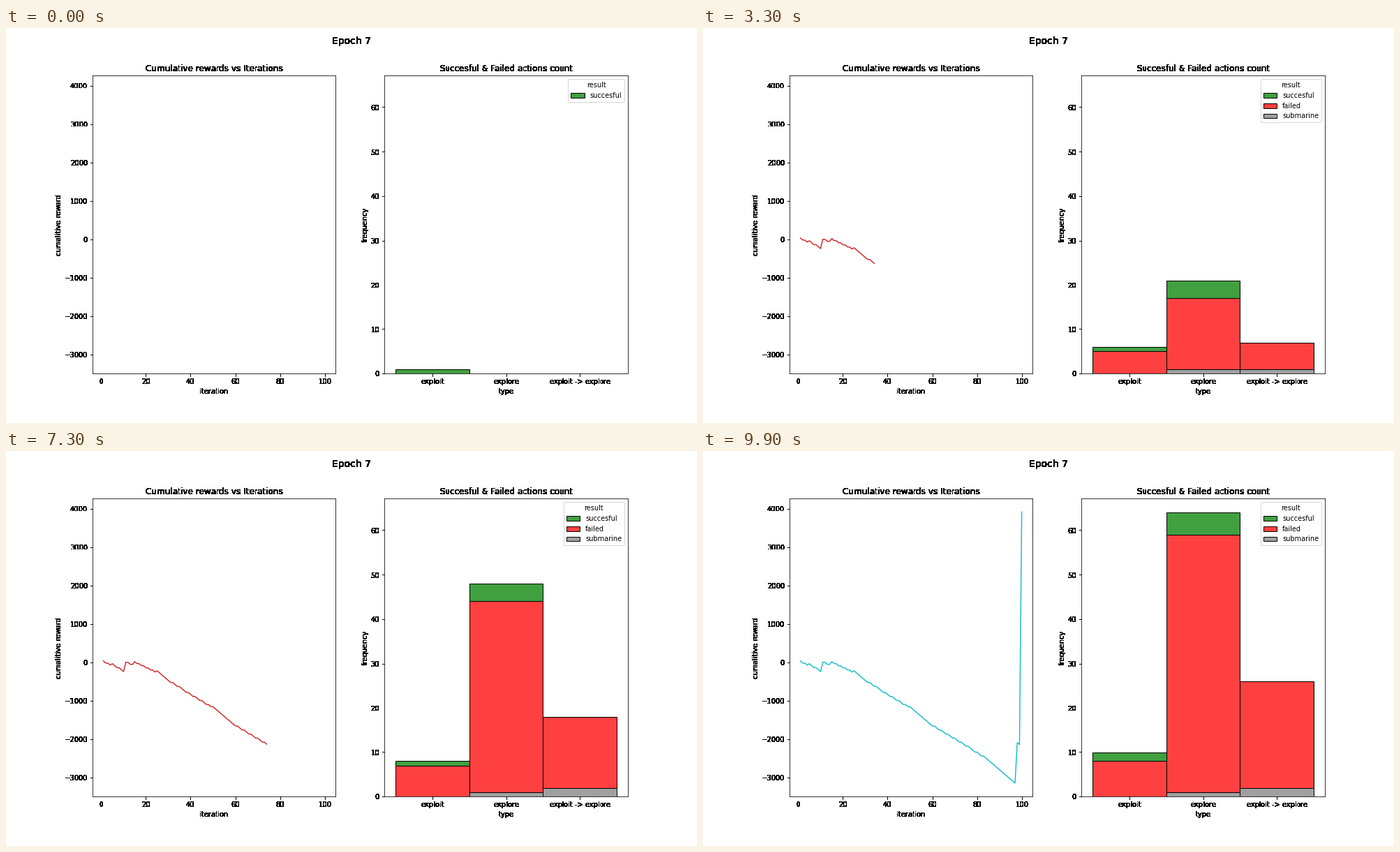
These frames come from a looping animation (990x566 px, 10 s). A matplotlib script:

```python
import numpy as np
import matplotlib.pyplot as plt
from matplotlib.animation import FuncAnimation
from matplotlib.colors import to_rgba
from matplotlib.patches import Patch

WIDTH, HEIGHT = 990, 566
DPI = WIDTH / 14
STEPS = 100
RESULTS = {"succesful": "green", "failed": "red", "submarine": "gray"}
TYPES = ["exploit", "explore", "exploit -> explore"]
OK, FAIL, SUB = range(3)

# Iterations that do not simply fail: result, type index
EVENTS = {1: (OK, 0), 5: (OK, 1), 11: (OK, 1), 15: (OK, 1), 20: (SUB, 1),
          25: (OK, 1), 30: (SUB, 2), 52: (SUB, 2), 98: (OK, 1), 100: (OK, 0)}

# Failures per type at a few points of the run
FAILURES = np.array([(0, 0, 0), (4, 5, 4), (5, 27, 8),
                     (5, 35, 15), (8, 51, 17), (8, 58, 24)])

# Course of the reward: iteration, value
COURSE = [(1, 30), (4, -75), (5, -40), (10, -250), (11, 0), (14, -60),
          (15, 15), (24, -255), (25, -225), (29, -437), (47, -1095),
          (50, -1155), (58, -1570), (84, -2498), (97, -3150), (98, -2095),
          (99, -2145), (100, 3915)]


def count_actions():
    """Counts per [step, result, type]; a failure goes to the type lagging most."""
    counts = np.zeros((STEPS + 1, 3, 3), int)
    totals = FAILURES.sum(axis=1)
    failed = 0
    for n in range(1, STEPS + 1):
        counts[n] = counts[n - 1]
        if n in EVENTS:
            counts[n][EVENTS[n]] += 1
            continue
        failed += 1
        goal = [np.interp(failed, totals, col) for col in FAILURES.T]
        counts[n, FAIL, np.argmax(goal - counts[n, FAIL])] += 1
    return counts


def collect_rewards():
    """Follow the course in losses of 50 or 5, with a jump on each success."""
    values = []
    for n, goal in zip(iterations, np.interp(iterations, *zip(*COURSE))):
        if EVENTS.get(n, (FAIL,))[0] == OK:
            values.append(goal)
        else:
            values.append(min((values[-1] - loss for loss in (50, 5)),
                              key=lambda v: abs(v - goal)))
    return values


def label(ax, title, xlabel, ylabel):
    ax.set_title(title, fontsize=12)
    ax.set_xlabel(xlabel)
    ax.set_ylabel(ylabel)


def show_spines(visible):
    for ax in (left, right):
        ax.spines[:].set_visible(visible)


def nearest(size, full):
    return ((np.arange(size) + 0.5) * full / size).astype(int)


def freeze_labels():
    """Turn labels and ticks into a solid black overlay, sampled down from 72 dpi."""
    show_spines(False)
    fig.set_dpi(72)
    fig.canvas.draw()
    ink = np.array(fig.canvas.buffer_rgba())[..., 0] < 250
    fig.set_dpi(DPI)
    rows, cols = (nearest(*s) for s in zip((HEIGHT, WIDTH), ink.shape))
    overlay = np.zeros((HEIGHT, WIDTH, 4))
    overlay[..., 3] = ink[np.ix_(rows, cols)]
    fig.figimage(overlay, origin="upper", zorder=5)
    show_spines(True)
    heading.set_visible(False)
    for ax in (left, right):
        for part in (ax.title, ax.xaxis, ax.yaxis):
            part.set_visible(False)


plt.rcParams.update({"font.family": "DejaVu Sans", "font.size": 10})
fig, (left, right) = plt.subplots(
    1, 2, figsize=(WIDTH / DPI, (HEIGHT + 0.01) / DPI), dpi=DPI)
fig.subplots_adjust(left=0.125, right=0.9, bottom=0.125, top=0.88, wspace=0.2)
heading = fig.suptitle("Epoch 7", fontsize=14, y=0.98)

label(left, "Cumulative rewards vs Iterations", "iteration", "cumalitive reward")
left.set(xlim=(-3.95, 104.95), ylim=(-3503, 4268),
         xticks=range(0, 101, 20), yticks=range(-3000, 4001, 1000))

label(right, "Succesful & Failed actions count", "type", "frequency")
right.set_xticks(range(3), TYPES)
right.set(xlim=(-0.65, 2.65), ylim=(0, 67.2), yticks=range(0, 61, 10))

freeze_labels()

iterations = np.arange(1, STEPS + 1)
rewards = collect_rewards()
counts = count_actions()

line, = left.plot([], [], lw=1.5)
styles = [dict(facecolor=to_rgba(c, 0.75), edgecolor="black", linewidth=1)
          for c in RESULTS.values()]
bars = [right.bar(range(3), [0] * 3, width=1, **s) for s in styles]
keys = [Patch(label=name, **s) for name, s in zip(RESULTS, styles)]
right.set(xlim=(-0.65, 2.65), ylim=(0, 67.2))


def update(i):
    line.set_data(iterations[:i + 1], rewards[:i + 1])
    line.set_color(f"C{i % 10}")
    now = counts[i + 1]
    base = np.zeros(3, int)
    for kind in (SUB, FAIL, OK):
        for bar, y, h in zip(bars[kind], base, now[kind]):
            bar.set(y=y, height=h, visible=h > 0)
        base = base + now[kind]
    shown = [key for key, row in zip(keys, now) if row.any()]
    right.legend(handles=shown, title="result", loc="upper right")


anim = FuncAnimation(fig, update, frames=STEPS, interval=100,
                     repeat=True, repeat_delay=0)
plt.show()
```
